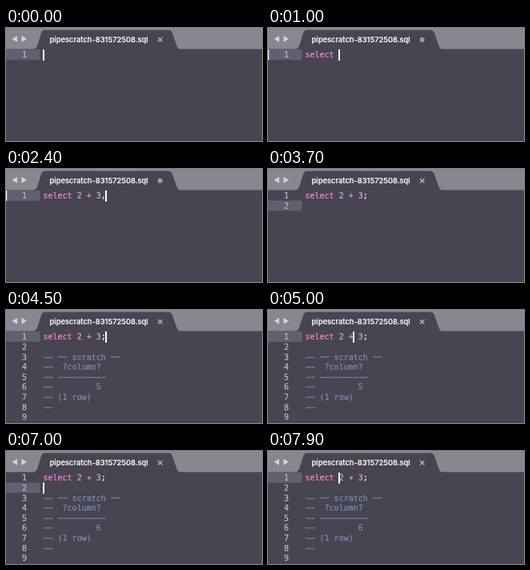
Animation of 320 by 142 pixels, one loop 8000 ms. Source, as an HTML page:

```html
<!DOCTYPE html>
<html lang="en">
<meta charset="utf-8">
<title>SQL scratch file</title>
<style>
  html, body { margin: 0; width: 320px; height: 142px; overflow: hidden; background: #474551; }
  svg { display: block; }
  text { white-space: pre; fill: #f8f8f4; stroke: #f8f8f4; stroke-width: .2; }
  .mono { font: 10px "DejaVu Sans Mono", monospace; }
  .title { font: 500 9.4px Inter, sans-serif; fill: #fff; stroke: #fff; }
  .num text { fill: #bebcc8; stroke: #bebcc8; text-anchor: end; }
  .out text { fill: #7f8cb8; stroke: #7f8cb8; }
  .key { fill: #ff85d3; stroke: #ff85d3; }
  .val { fill: #c9a8fb; stroke: #c9a8fb; }
</style>
<svg width="320" height="142" viewBox="0 0 320 142">
  <rect width="320" height="26.500" fill="#88868f"/>
  <path d="M34 27Q38 26 39.500 21L44 6.500Q45.300 2.500 49 2.500H203Q206.500 2.500 208 6.500L213 21Q214.500 26 218 27Z" fill="#474551"/>
  <path d="M14 9.700V17.700L7.500 13.700ZM19.500 9.700V17.700L26 13.700Z" fill="#d3d2d6"/>
  <text class="title" x="54.500" y="18">pipescratch-831572508.sql</text>
  <path id="close" d="M190 12l5.500 5.500m0-5.500l-5.500 5.500" stroke="#bdbcc1" stroke-width="1.200"/>
  <circle id="dirty" cx="192.700" cy="14.700" r="3" fill="#9f9da6"/>
  <rect id="active" width="42.500" height="13" fill="#615f70"/>
  <rect id="marker" y="27" width="1.200" height="13" fill="#f4f4f6"/>
  <g id="numbers" class="mono num"></g>
  <text id="query" class="mono" x="46.500" y="37.400"></text>
  <g id="output" class="mono out"></g>
  <rect id="caret" width="2" height="14" fill="#fff"/>
</svg>
<script>
const LOOP = 8000, TOP = 27, ROW = 12.6, LEFT = 46.5, CHAR = 6.02;
const $ = id => document.getElementById(id);

// Keystrokes: ⌫ delete, ⏎ newline, arrows move, S saves, R runs the query.
const keys = [
  [100, 's'], [200, 'e'], [300, 'l'], [400, 'e'], [500, 'c'], [700, 't'], [900, ' '],
  [1200, '2'], [1300, ' '], [1500, '+ '], [1700, '3'], [2400, ','],
  [2800, '⌫'], [2900, ';'], [3000, '⏎'], [3200, 'S'], [3800, 'R'],
  [4500, '←'], [4800, '←'], [4900, '←'], [5000, '←'],
  [5300, '⌫'], [5500, '*'], [5700, 'S'], [6300, 'R'],
  [6800, '↓'], [7500, '↑'], [7700, '←'], [7900, '←←']
];

function press(s, key) {
  const edit = (from, text) => {
    s.line = s.line.slice(0, from) + text + s.line.slice(s.col);
    s.col = from + text.length;
    s.dirty = s.marker = true;
  };
  if (key === '⌫') edit(s.col - 1, '');
  else if (key === '⏎') { s.row = 1; s.rows = 2; s.marker = false; }
  else if (key === '↓') s.row = 1;
  else if (key === '↑') s.row = 0;
  else if (key === '←') { if (s.row) s.row = 0; else s.col--; }
  else if (key === 'S') s.dirty = false;
  else if (key === 'R') {
    const [a, op, b] = s.line.match(/[\d+*]/g);
    s.result = op === '+' ? +a + +b : a * b;
    s.rows = 9;
    s.marker = false;
  } else edit(s.col, key);
}

function stateAt(time) {
  const s = { line: '', row: 0, col: 0, rows: 1, dirty: false, marker: false, result: null, touched: 0 };
  for (const [at, strokes] of keys) {
    if (at > time) break;
    for (const key of strokes) press(s, key);
    if (strokes !== 'S') s.touched = at;
  }
  return s;
}

// Wide dashes and a centred asterisk, as the editor's font draws them.
const glyphs = text => text.replace(/-/g, '−').replace(/\*/g, '∗');

const textRow = (text, row, x) =>
  `<text x="${x}" y="${(TOP + 10.4 + row * ROW).toFixed(1)}">${text}</text>`;

const colour = line => glyphs(line)
  .replace(/\d/g, '<tspan class="val">$&</tspan>')
  .replace(/select|[+∗]/g, '<tspan class="key">$&</tspan>');

const report = result => ['-- ~~ scratch ~~', '--  ?column?', '-- ----------',
  '--' + String(result).padStart(10), '-- (1 row)', '--'];

// The caret rests, fades out, then fades back in.
function blink(age) {
  const phase = age % 1000;
  return Math.min(1, Math.max(0, (300 - phase) / 200 + 1, (phase - 800) / 200));
}

const show = (id, on) => $(id).setAttribute('visibility', on ? 'visible' : 'hidden');

let shown = -1;
function frame(now) {
  const time = Math.floor(now % LOOP / 100) * 100;
  if (time !== shown) {
    shown = time;
    const s = stateAt(time), y = TOP + s.row * ROW;
    $('query').innerHTML = colour(s.line);
    $('numbers').innerHTML = Array.from({ length: s.rows }, (_, i) => textRow(i + 1, i, 26)).join('');
    $('output').innerHTML = s.result === null ? '' :
      report(s.result).map((text, i) => textRow(glyphs(text), i + 2, LEFT)).join('');
    show('dirty', s.dirty);
    show('close', !s.dirty);
    show('marker', s.marker);
    $('active').setAttribute('y', y);
    $('caret').setAttribute('x', Math.round(LEFT - 0.6 + (s.row ? 0 : s.col * CHAR)));
    $('caret').setAttribute('y', y);
    $('caret').setAttribute('opacity', blink(time - s.touched));
  }
  requestAnimationFrame(frame);
}
frame(0);
</script>
</html>
```
